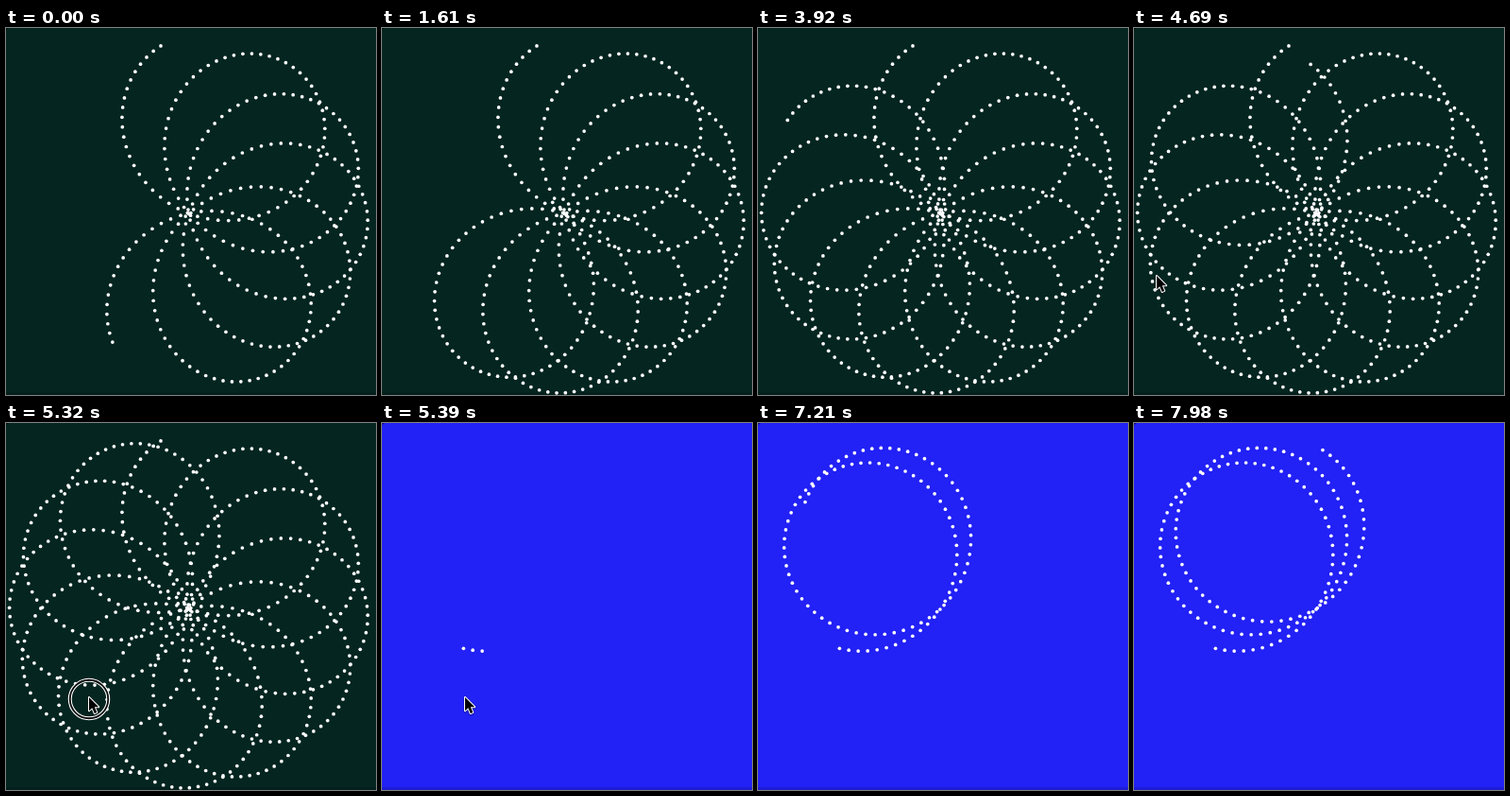
An HTML page with a canvas for the animation above (8 s loop, 392x388 px).

```html
<!DOCTYPE html>
<html lang="en">
<head>
<meta charset="utf-8">
<title>Dotted spirograph</title>
<style>
  html, body { margin: 0; width: 100%; height: 100%; overflow: hidden; background: #052520; }
  canvas { display: block; }
</style>
</head>
<body>
<canvas id="stage" width="392" height="388"></canvas>
<script>
const ctx = document.getElementById('stage').getContext('2d');
const W = 392, H = 388;
const LOOP = 8000, STEP = 70, RESET = 5390;
const CENTER = { x: 193.6, y: 196 }, RADIUS = 95, DOT = 1.85;
const rad = deg => deg * Math.PI / 180;

// Two arms of equal length: the carrier turns slowly clockwise, the pen quickly the other way.
// Angles are in degrees, drift and spin in degrees per dot, rate in dots per ms.
const FLOWER = { bg: '#052520', carrier: -80.4, drift: 0.5473, pen: -118.6, spin: 6.167, start: 0, first: 306.5, rate: 4 / STEP };
const RINGS = { bg: '#2221f6', carrier: -148.9, drift: 0.221, pen: 105.8, spin: 5.943, start: RESET, first: 2.5, rate: 0.0568 };

// Pointer path: time, x, y
const POINTER = [
  [4690, 24, 262], [4830, 66, 292], [4900, 92, 301], [5040, 88, 290],
  [5950, 88, 290], [6090, 52, 284], [6160, 4, 278]
];
const PRESS = [5180, RESET];

function disc(x, y, r) {
  ctx.beginPath();
  ctx.arc(x, y, r, 0, 2 * Math.PI);
}

function drawCurve(c, t) {
  const last = Math.floor(c.first + c.rate * (t - c.start));
  ctx.fillStyle = '#fff';
  for (let n = 0; n <= last; n++) {
    const a = rad(c.carrier + c.drift * n);
    const b = rad(c.pen - c.spin * n);
    disc(CENTER.x + RADIUS * (Math.cos(a) + Math.cos(b)),
         CENTER.y + RADIUS * (Math.sin(a) + Math.sin(b)), DOT);
    ctx.fill();
  }
}

function pointerAt(t) {
  const i = POINTER.findIndex(k => k[0] > t);
  if (i < 1) return null;
  const [t0, x0, y0] = POINTER[i - 1], [t1, x1, y1] = POINTER[i];
  const u = (t - t0) / (t1 - t0);
  return { x: x0 + (x1 - x0) * u, y: y0 + (y1 - y0) * u };
}

function drawPress({ x, y }) {
  const circle = (r, width, color) => {
    disc(x, y + 2, r);
    ctx.lineWidth = width;
    ctx.strokeStyle = color;
    ctx.stroke();
  };
  circle(20.2, 3.2, '#050808');
  circle(21.7, 1.1, '#fff');
  circle(18.8, 1.1, '#fff');
}

const ARROW = new Path2D('M0 0V14.2L3.3 11.2L5.8 17L8.3 15.9L5.8 10.3H10.2Z');

function drawPointer({ x, y }) {
  ctx.save();
  ctx.translate(x, y);
  ctx.lineJoin = 'round';
  ctx.lineWidth = 2;
  ctx.strokeStyle = '#fff';
  ctx.shadowColor = 'rgba(0,0,0,.4)';
  ctx.shadowBlur = 2;
  ctx.shadowOffsetY = 1;
  ctx.stroke(ARROW);
  ctx.shadowColor = 'transparent';
  ctx.fillStyle = '#000';
  ctx.fill(ARROW);
  ctx.restore();
}

function drawFrameEdges() {
  ctx.fillStyle = 'rgba(0,0,0,.14)';
  ctx.fillRect(0, H - 3, W, 3);
  ctx.fillStyle = 'rgba(0,0,0,.6)';
  ctx.beginPath();
  ctx.moveTo(0, 0);
  ctx.lineTo(4, 0);
  ctx.quadraticCurveTo(0, 0, 0, 4);
  ctx.fill();
}

function render(now) {
  const t = Math.floor((now % LOOP) / STEP) * STEP;
  const curve = t < RESET ? FLOWER : RINGS;
  ctx.fillStyle = curve.bg;
  ctx.fillRect(0, 0, W, H);
  drawFrameEdges();
  drawCurve(curve, t);
  const pointer = pointerAt(t);
  if (pointer) {
    if (t >= PRESS[0] && t < PRESS[1]) drawPress(pointer);
    drawPointer(pointer);
  }
}

const origin = performance.now();
function tick() {
  render(performance.now() - origin);
  requestAnimationFrame(tick);
}
tick();
</script>
</body>
</html>
```
